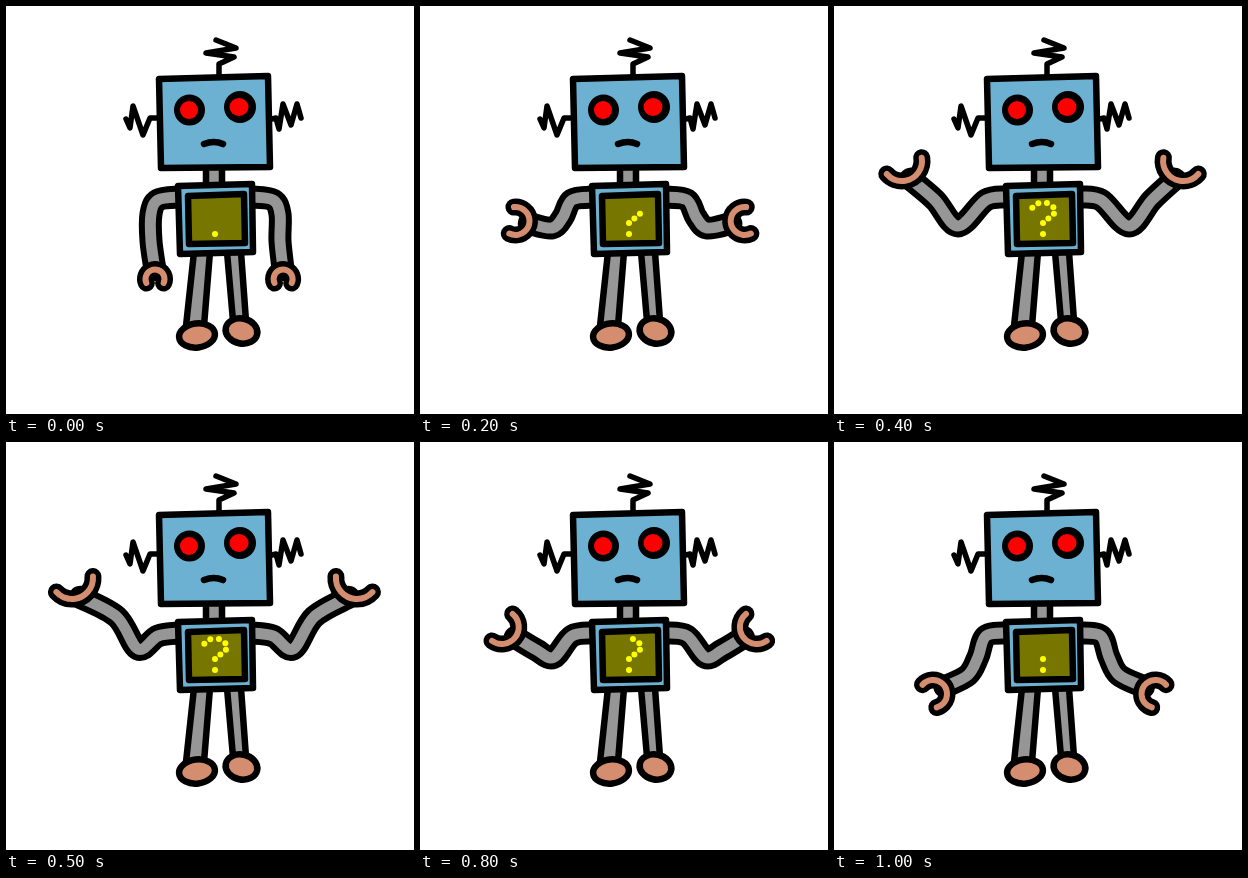
Recreate the animation shown at these times as an HTML page with a canvas. Size 408 by 408 pixels, loop 1100 ms.

```html
<!DOCTYPE html>
<html lang="en">
<head>
<meta charset="utf-8">
<title>Shrugging robot</title>
<style>
html, body { margin: 0; width: 100%; height: 100%; overflow: hidden; background: #fff; }
canvas { display: block; }
</style>
</head>
<body>
<canvas id="stage" width="408" height="408"></canvas>
<script>
const ctx = document.getElementById('stage').getContext('2d');
const BLUE = '#6cb1d2', GRAY = '#969696', SKIN = '#d58d6f', OLIVE = '#777600';
const MIRROR = 419, LINE = 6.5, STEP = 100;
const rad = deg => deg * Math.PI / 180;

// Left arm: bends [x, y, x, y]; claw arc [x, y, radius, degrees towards the wrist]
const pose = (bends, claw) => ({ bends, claw });
const mean = (a, b) => a.map((v, i) => (v + b[i]) / 2);
const between = (p, q) => pose(mean(p.bends, q.bends), mean(p.claw, q.claw));

const hanging = pose([145, 208, 145, 235], [149, 273, 9.5, -90]);
const lifting = pose([144, 215, 134, 233], [99, 252, 14, -32]);
const level = pose([143, 211, 132, 222], [95.5, 215, 14, 10]);
const raised = pose([124, 220, 101, 194], [68, 155, 20, 65]);
const shrug = pose([132, 207, 111, 175], [66, 136, 21, 67]);
const poses = [hanging, lifting, level, between(level, raised), raised, shrug];
const LAST = poses.length - 1;

function paint(path, fill, width = LINE, color = '#000') {
  if (fill) { ctx.fillStyle = fill; ctx.fill(path); }
  if (width) { ctx.lineWidth = width; ctx.strokeStyle = color; ctx.stroke(path); }
}

const draw = (d, fill, width) => paint(new Path2D(d), fill, width);

function oval(x, y, rx, ry, fill, width = 0, tilt = 0) {
  const path = new Path2D();
  path.ellipse(x, y, rx, ry, tilt, 0, 2 * Math.PI);
  paint(path, fill, width);
}

// Black stroke with a coloured core
function tube(path, color, outer, inner) {
  paint(path, null, outer);
  paint(path, null, inner, color);
}

// Smooth curve through every point
function spline(pts) {
  const path = new Path2D();
  path.moveTo(...pts[0]);
  for (let i = 0; i < pts.length - 1; i++) {
    const a = pts[i], b = pts[i + 1], before = pts[i - 1] || a, after = pts[i + 2] || b;
    const out = a.map((v, k) => v + (b[k] - before[k]) / 6);
    const into = b.map((v, k) => v - (after[k] - a[k]) / 6);
    path.bezierCurveTo(...out, ...into, ...b);
  }
  return path;
}

function drawArm({ bends, claw }, right) {
  let [x, y, r, deg] = claw;
  // The right claw swings slightly wider than the left
  if (right) x -= (x - 85) / 9;
  const angle = rad(deg), spread = Math.min(2, 26 / r);
  const wrist = [x + r * Math.cos(angle), y + r * Math.sin(angle)];
  const hand = new Path2D();
  hand.arc(x, y, r, angle - spread, angle + spread);

  ctx.save();
  if (right) { ctx.translate(MIRROR, 0); ctx.scale(-1, 1); }
  tube(spline([[174, 191], [152, 194], bends.slice(0, 2), bends.slice(2), wrist]), GRAY, 23, 11);
  tube(hand, SKIN, 17, 6);
  ctx.restore();
}

function drawHead() {
  draw('M213 70V58L228 51L200 47L230 42L210 34', null, 5.5);
  draw('M154 112H144L137 129L127 100L124 122L120 113', null, 5.5);
  draw('M266 113L270 112L273 123L277 98L285 119L291 98L295 112', null, 5.5);
  draw('M200 160V180H216V160', GRAY);
  draw('M153 73L262 70L264 161L155 162Z', BLUE);
  oval(183.5, 104, 15.5, 15.5, '#000');
  oval(183, 104, 9, 9, '#f00');
  oval(234, 101, 16, 16, '#000');
  oval(233, 101, 9.5, 9, '#f00');
  draw('M198 138Q208 134 217 138');
}

function drawLegs() {
  draw('M188 246L180 320H198L204 246Z', GRAY);
  draw('M221 246L227 315H240L235 246Z', GRAY);
  oval(191, 329.5, 18, 12, SKIN, LINE, -0.12);
  oval(235.5, 325, 16, 12.5, SKIN, LINE, 0.2);
}

// Question mark: two stem dots, then a hook swept along an ellipse
function drawDot(i) {
  const a = rad(62 - 44 * (i - 2));
  if (i < 2) oval(209, 228 - 11 * i, 3, 3, '#ff0');
  else oval(209 + 11.5 * Math.cos(a), 205 + 8.5 * Math.sin(a), 3, 3, '#ff0');
}

function drawBody(count) {
  draw('M172 180L246 178L247 246L174 248Z', BLUE);
  draw('M182 190L238 188L239 237L183 238Z', OLIVE);
  for (let i = 0; i < count; i++) drawDot(i);
}

function render(time) {
  const step = Math.floor(time / STEP) % (2 * LAST + 1);
  const index = Math.min(step, 2 * LAST + 1 - step);
  ctx.fillStyle = '#fff';
  ctx.fillRect(0, 0, 408, 408);
  ctx.lineJoin = ctx.lineCap = 'round';
  drawLegs();
  drawArm(poses[index], false);
  drawArm(poses[index], true);
  drawHead();
  drawBody(Math.min(8, Math.max(1, 2 * index)));
}

const start = performance.now();
function tick() {
  render(performance.now() - start);
  requestAnimationFrame(tick);
}
tick();
</script>
</body>
</html>
```
